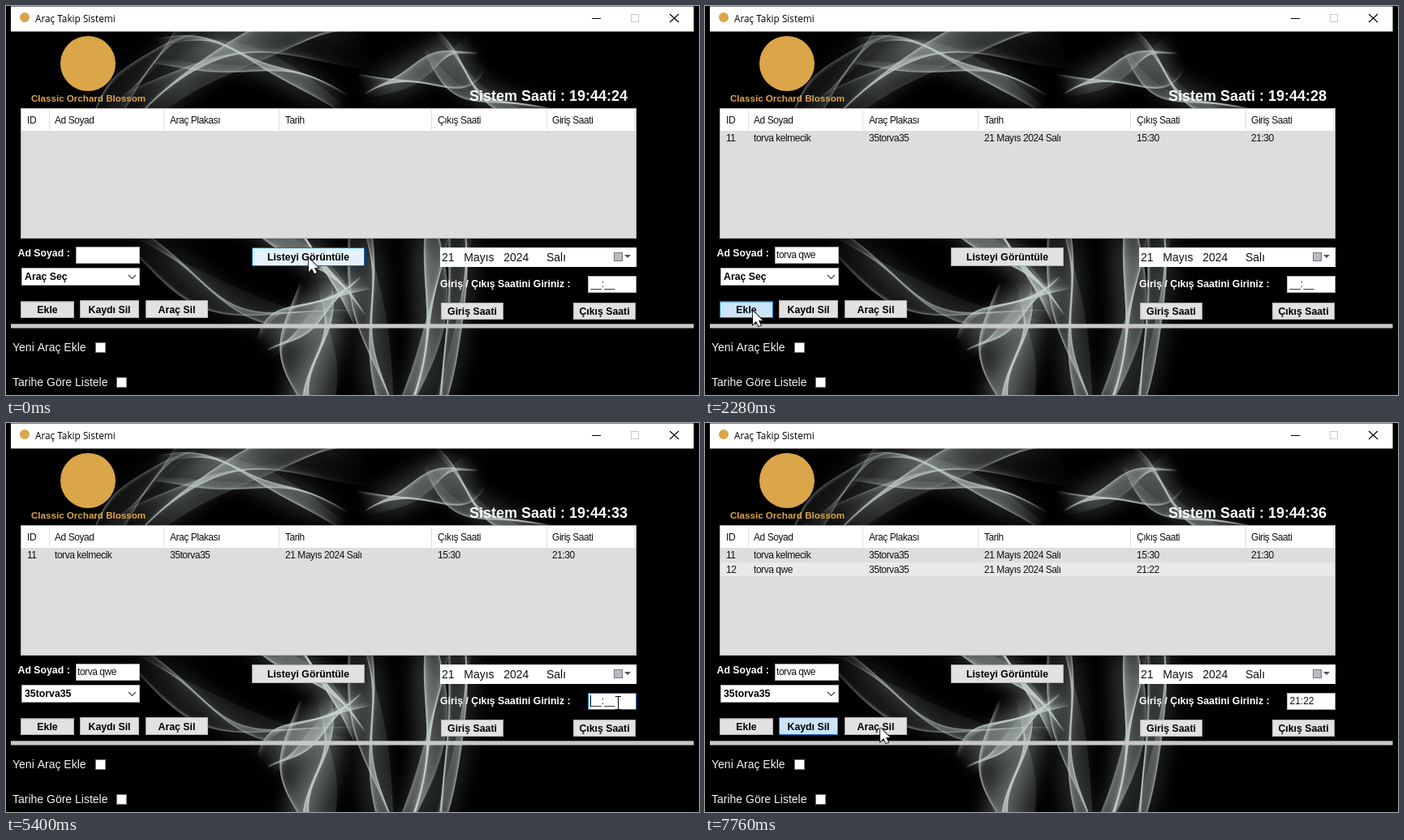
Animation of 854 by 480 pixels, one loop 7800 ms. Source, as an HTML page with a canvas:

```html
<!DOCTYPE html>
<html lang="tr">
<head>
<meta charset="utf-8">
<title>Araç Takip Sistemi</title>
<style>
  html, body { margin: 0; width: 100%; height: 100%; overflow: hidden; background: #000; }
  canvas { display: block; }
</style>
</head>
<body>
<canvas id="stage" width="854" height="480"></canvas>
<script>
const LOOP = 7800, BLINK = 680;
const BLUE = '#0078d7', GOLD = '#dba54a';
const SANS = '"Liberation Sans", Arial, sans-serif';
const NAME = 'torva kelmecik', TYPED = 'torva qwe', PLATE = '35torva35';
const DAY = '21 Mayıs 2024 Salı', HOUR = '21:22';

const stage = document.getElementById('stage');
const bg = document.createElement('canvas');
bg.width = 854;
bg.height = 480;
let g = bg.getContext('2d');

const between = (t, a, b) => t >= a && t < b;
const smooth = k => k * k * (3 - 2 * k);
const mix = (a, b, k) => a + (b - a) * k;

let seed = 7;
const random = () => (seed = seed * 16807 % 2147483647) / 2147483647;

function fill(x, y, w, h, color) {
  g.fillStyle = color;
  g.fillRect(x, y, w, h);
}

function frame(x, y, w, h, color, line = 1) {
  g.strokeStyle = color;
  g.lineWidth = line;
  g.strokeRect(x + line / 2, y + line / 2, w - line, h - line);
}

function box(x, y, w, h, color, border, line) {
  fill(x, y, w, h, color);
  frame(x, y, w, h, border, line);
}

function trace(points) {
  g.beginPath();
  for (const [x, y] of points) g.lineTo(x, y);
}

function line(points, color, width = 1) {
  g.strokeStyle = color;
  g.lineWidth = width;
  trace(points);
  g.stroke();
}

function disc(x, y, r, color) {
  g.fillStyle = color;
  g.beginPath();
  g.arc(x, y, r, 0, Math.PI * 2);
  g.fill();
}

function text(str, x, y, { size = 12, weight = 400, color = '#111', align = 'left', gap = 0, family = SANS } = {}) {
  g.font = `${weight} ${size}px ${family}`;
  g.letterSpacing = gap + 'px';
  g.textAlign = align;
  g.fillStyle = color;
  g.fillText(str, x, y);
}

const bold = (str, x, y, color = '#000', align = 'left') =>
  text(str, x, y, { size: 12.3, weight: 700, color, align });
const small = (str, x, y) => text(str, x, y, { gap: -0.45 });

// A folded sheet of smoke: strands slide over each other along a bent spine
function plume(x0, y0, x1, y1, bend, width, alpha) {
  const dx = x1 - x0, dy = y1 - y0, len = Math.hypot(dx, dy);
  const phase = random() * 6, turn = 2 + random() * 2;
  const at = (u, shift) => {
    const side = (bend * Math.sin(Math.PI * u) + shift) / len;
    return [x0 + dx * u - dy * side, y0 + dy * u + dx * side];
  };
  const strand = k => Array.from({ length: 41 }, (_, i) => {
    const u = i / 40;
    const fold = Math.sin(3 * k + turn * u + phase) + 0.45 * Math.sin(8 * k - 4 * u + phase * 2);
    return at(u, width * fold * (0.75 + 0.25 * Math.cos(5 * u + phase)));
  });
  const ink = a => {
    const fade = g.createLinearGradient(x0, y0, x1, y1);
    [0, a, a, 0].forEach((v, i) => fade.addColorStop([0, 0.25, 0.75, 1][i], `rgba(200,212,206,${v})`));
    return fade;
  };
  g.filter = 'blur(12px)';
  line(strand(0.5), ink(alpha * 3), width * 1.5);
  g.filter = 'none';
  const soft = ink(alpha);
  for (let i = 0; i < 130; i++) line(strand(i / 130), soft, 1.3);
}

function smoke() {
  plume(90, 140, 240, 30, 0, 22, 0.025);
  plume(150, 140, 450, 45, -30, 30, 0.07);
  plume(180, 60, 420, 120, -35, 22, 0.07);
  plume(440, 105, 580, 50, 15, 24, 0.08);
  plume(520, 45, 670, 135, 10, 20, 0.07);

  plume(150, 285, 430, 385, 25, 20, 0.045);
  plume(300, 255, 440, 385, -25, 20, 0.11);
  plume(440, 335, 325, 430, 15, 20, 0.1);
  plume(375, 340, 390, 540, 0, 30, 0.11);
  plume(430, 250, 485, 540, 0, 18, 0.07);
  plume(535, 240, 470, 540, -25, 15, 0.1);
  plume(570, 240, 510, 540, -10, 18, 0.06);
}

function row(y, cells) {
  const cols = [26, 60, 202, 344, 532, 673];
  cells.forEach((cell, i) => small(cell, cols[i], y));
}

function paintBackdrop() {
  fill(0, 0, 854, 480, '#000');
  smoke();
  fill(0, 0, 854, 31, '#000');
  fill(6, 0.5, 841.5, 31, '#fff');
  disc(23, 14, 6, GOLD);
  disc(101, 71, 34, GOLD);
  text('Classic Orchard Blossom', 31, 118, { size: 11.6, weight: 700, color: GOLD });

  box(18, 126, 759, 161, '#dcdddc', '#b4b6b8');
  fill(19, 127, 757, 27, '#fff');
  for (const x of [53, 194, 336, 524, 666, 774]) fill(x, 128, 1, 25, '#dedede');
  row(145, ['ID', 'Ad Soyad', 'Araç Plakası', 'Tarih', 'Çıkış Saati', 'Giriş Saati']);

  fill(6, 392.3, 841.5, 5.2, '#c8c8c8');
  bold('Ad Soyad :', 14.5, 309, '#fff');
  bold('Giriş / Çıkış Saatini Giriniz :', 535, 347, '#fff');
  text('Yeni Araç Ekle', 8, 426, { size: 14, color: '#f2f2f2' });
  text('Tarihe Göre Listele', 8, 469, { size: 14, color: '#f2f2f2' });
  box(110, 415, 13, 13, '#fff', '#777');
  box(136, 458, 13, 13, '#fff', '#777');

  fill(535, 298, 242, 24, '#fff');
  text('21   Mayıs   2024', 537, 315, { size: 14 });
  text('Salı', 666, 315, { size: 14 });
  box(749, 304, 11, 11, '#b9bdc2', '#777');
  trace([[762, 307], [770, 307], [766, 311]]);
  g.fillStyle = '#555';
  g.fill();
}

// ax and ay say where in the box the pointer likes to rest
const widget = (x, y, w, h, label, ax = 0.62, ay = 0.55) =>
  ({ x, y, w, h, label, aim: [x + w * ax, y + h * ay] });
const widgets = {
  list: widget(303, 298, 139, 23, 'Listeyi Görüntüle', 0.5),
  add: widget(18, 364.5, 66, 20.5, 'Ekle'),
  drop: widget(91, 363, 73, 22, 'Kaydı Sil'),
  car: widget(172, 363, 77, 22, 'Araç Sil'),
  enter: widget(536, 366, 77, 21, 'Giriş Saati'),
  exit: widget(699, 366, 77, 21, 'Çıkış Saati'),
  name: widget(86, 297, 79, 21),
  combo: widget(19, 323, 146, 22),
  item: widget(19, 345, 146, 16, '', 0.73, 1),
  time: widget(717, 333, 60, 21)
};
const buttons = Object.keys(widgets).filter(id => widgets[id].label);

// Pointer visits: arrival, departure, widget; each is clicked soon after arrival
const visits = [
  [0, 110, 'list'], [400, 2050, 'name'], [2220, 2480, 'add'], [2900, 3060, 'combo'],
  [3240, 3560, 'item'], [4100, 4900, 'add'], [5300, 5960, 'time'], [6140, 6300, 'exit'],
  [6510, 6780, 'add'], [7020, 7160, 'list'], [7540, 7700, 'drop'], [7770, LOOP, 'car']
];
const clicks = visits.map(([arrive, , id]) => ({ at: arrive + 60, id }));
const keepsFocus = { item: 'combo', exit: 'time' };
const PICKED = 3300, ADDED = 7120;
const away = t => between(t, 4440, 5000);

function pointer(t) {
  const next = visits.findIndex(v => v[1] > t);
  const [arrive, , id] = visits[next];
  const [x1, y1] = widgets[id].aim;
  if (t >= arrive || !next) return [x1, y1];
  const [, leave, from] = visits[next - 1];
  const [x0, y0] = widgets[from].aim;
  const k = smooth((t - leave) / (arrive - leave));
  const sag = 0.05 * Math.hypot(x1 - x0, y1 - y0) * Math.sin(Math.PI * k);
  return [mix(x0, x1, k), mix(y0, y1, k) + sag];
}

function over(id, t) {
  const [px, py] = pointer(t), { x, y, w, h } = widgets[id];
  return between(px, x, x + w) && between(py, y, y + h);
}

function focusAt(t) {
  const last = clicks.filter(c => c.at <= t).pop();
  if (!last) return { id: '', caret: false };
  return { id: keepsFocus[last.id] || last.id, caret: (t - last.at) % BLINK < BLINK / 2 };
}

const typed = (str, t, start, end) =>
  str.slice(0, Math.max(0, Math.floor((t - start) / (end - start) * str.length)));

const caret = (x, y) => fill(Math.round(x), y, 1, 14, '#000');

function drawButton(id, t, focus) {
  const { x, y, w, h, label } = widgets[id];
  // Hover fades in and out, so it trails the pointer
  const hover = over(id, t - 120) && !away(t);
  const lit = hover || over(id, t - 40) && !away(t);
  const pressed = clicks.some(c => c.id === id && between(t, c.at, c.at + 170));
  const focused = focus.id === id;
  box(x, y, w, h, pressed ? '#cce4f7' : hover ? '#e5f1fb' : '#e1e1e1',
    focused || lit || pressed ? BLUE : '#adadad', focused && !pressed ? 2 : 1);
  bold(label, x + w / 2, y + h / 2 + 4.5, '#000', 'center');
}

function drawField(id, focus) {
  const { x, y, w, h } = widgets[id];
  box(x, y, w, h, '#fff', focus.id === id ? BLUE : '#a8a8a8');
}

function drawName(t, focus) {
  const value = typed(TYPED, t, 560, 1600);
  drawField('name', focus);
  small(value, 88, 311);
  if (focus.id === 'name' && focus.caret) caret(89 + g.measureText(value).width, 300);
}

function drawTime(t, focus) {
  const value = typed(HOUR, t, 5520, 5960);
  drawField('time', focus);
  text(value + '__:__'.slice(value.length), 720.5, 347);
  const before = value === HOUR ? HOUR[0] : value;
  if (focus.id === 'time' && focus.caret) caret(720 + g.measureText(before).width, 336);
}

function drawCombo(t, focus) {
  drawField('combo', focus);
  if (focus.id === 'combo' && t < PICKED) {
    const { x, y, w, h } = widgets.item;
    box(148, 323, 17, 22, '#e5f1fb', BLUE);
    box(x, y, w, h, '#fff', '#555');
    bold(PLATE, 23, 358);
  }
  bold(t < PICKED ? 'Araç Seç' : PLATE, 23, 338);
  line([[151, 332], [155.5, 336.5], [160, 332]], '#444', 1.2);
  if (focus.id === 'combo' && focus.caret) caret(23, 327);
}

function drawPointer(t) {
  if (between(t, 4440, 4700)) return;
  const [x, y] = pointer(t).map(Math.round);
  if (over('name', t) || over('time', t)) {
    fill(x, y - 7, 1, 15, '#000');
    for (const end of [-8, 8]) fill(x - 3, y + end, 7, 1, '#000');
    return;
  }
  const arrow = [[0, 0], [0, 17], [4, 13], [7, 19], [10, 18], [7, 12], [12, 12], [0, 0]];
  line(arrow.map(([dx, dy]) => [x + dx, y + dy]), '#000', 1.6);
  g.fillStyle = '#fff';
  g.fill();
}

function drawTitle(t) {
  const ink = away(t) ? '#8c8c8c' : '#000';
  text('Araç Takip Sistemi', 36, 20, { size: 11.8, color: ink, family: '"Open Sans", "Noto Sans", sans-serif' });
  fill(722, 15, 11, 1, ink);
  frame(770, 10, 10, 10, '#c8c8c8');
  line([[818, 10], [829, 20]], ink, 1.1);
  line([[829, 10], [818, 20]], ink, 1.1);
}

function draw(t) {
  const focus = focusAt(t);
  g.drawImage(bg, 0, 0);
  drawTitle(t);
  const second = 24 + Math.floor((t + 400) / 640);
  text('Sistem Saati : 19:44:' + second, 571, 117, { size: 18, weight: 700, color: '#fff' });

  if (t >= 100) row(167, ['11', NAME, PLATE, DAY, '15:30', '21:30']);
  if (t >= ADDED) {
    fill(19, 172, 757, 17, '#e8eaea');
    row(185, ['12', TYPED, PLATE, DAY, HOUR, '']);
  }
  for (const id of buttons) drawButton(id, t, focus);
  drawName(t, focus);
  drawTime(t, focus);
  drawCombo(t, focus);
  drawPointer(t);
}

paintBackdrop();
g = stage.getContext('2d');
const start = performance.now();
function tick() {
  draw((performance.now() - start) % LOOP);
  requestAnimationFrame(tick);
}
tick();
</script>
</body>
</html>
```
